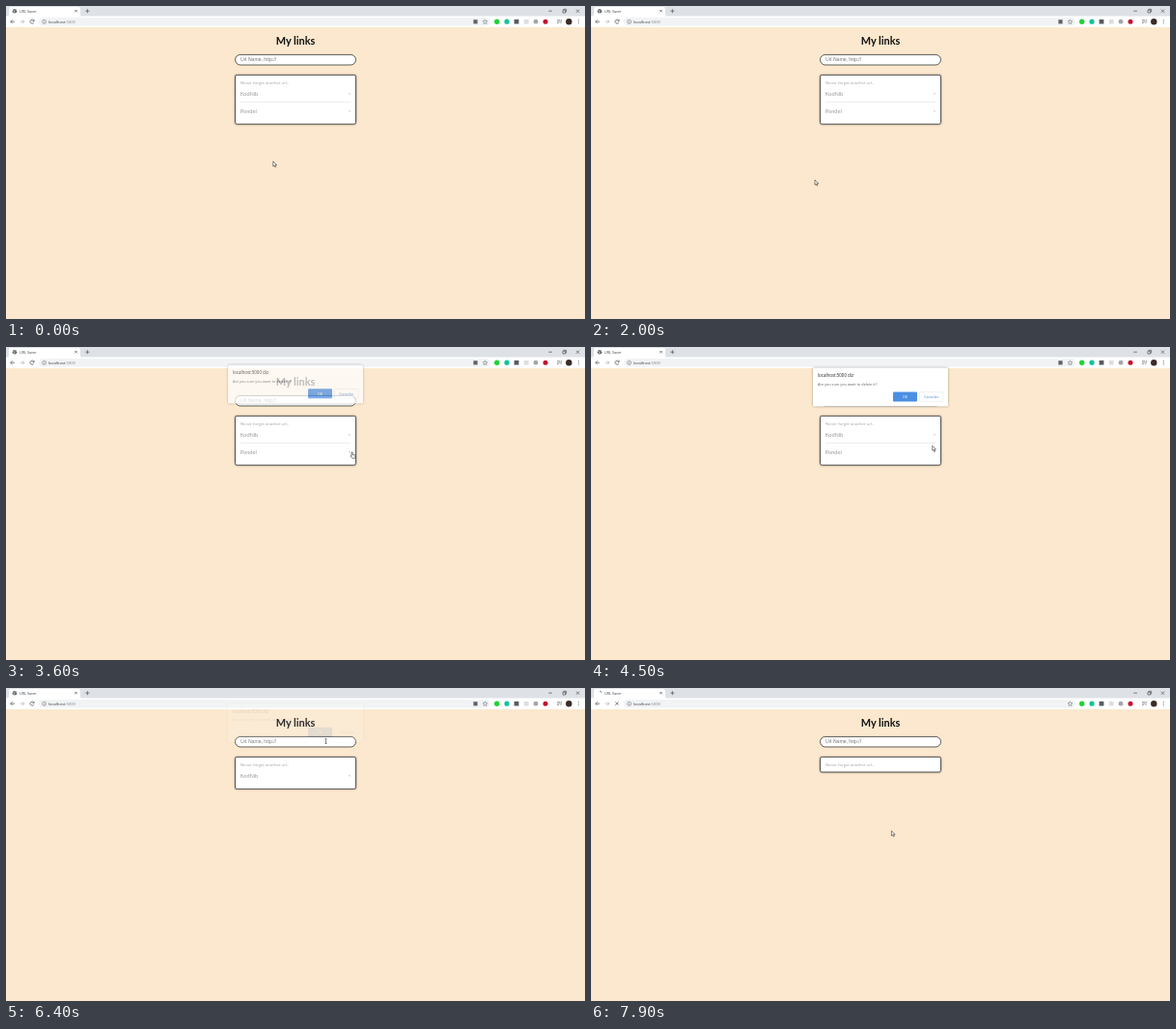
An HTML page that plays this animation: 600x324 px, repeating every 8 s.

```html
<!DOCTYPE html>
<html lang="en">
<head>
<meta charset="utf-8">
<title>URL Saver</title>
<style>
  html, body { margin: 0; width: 100%; height: 100%; overflow: hidden; background: #fbe8ce; }
  svg { display: block; width: 100vw; height: 100vh; }
  text { font-family: "Open Sans", sans-serif; fill: #3c4043; }
  .page text { font-family: Lato, sans-serif; }
  .page .field { font-family: "Liberation Sans", Arial, sans-serif; font-size: 5.1px; fill: #757575; }
  .row text { font-size: 5.6px; fill: #999; }
  .icon { fill: none; stroke: #5f6368; stroke-width: .8; }
  .box { fill: #fff; stroke: #333; stroke-width: .8; }
  .shadow { filter: drop-shadow(0 .8px 1.2px rgba(0, 0, 0, .4)); }
</style>
</head>
<body>
<svg viewBox="0 0 600 324">
  <g class="page">
    <rect width="600" height="324" fill="#fbe8ce"/>
    <text x="300" y="40" text-anchor="middle" font-size="10.9" font-weight="700" style="fill:#111">My links</text>
    <rect class="box" x="237.5" y="50.4" width="125" height="10.6" rx="5.3"/>
    <text class="field" x="243" y="57.4">Url Name, http://</text>
    <rect id="card" class="box shadow" x="237.5" y="71.4" width="125" height="50.8" rx="1.8"/>
    <text x="243" y="80.8" font-size="4.5" style="fill:#aaa">Never forget another url..</text>
    <g id="first" class="row">
      <text x="242.8" y="93">KodNib</text><text x="354.7" y="92.3" style="font-size:4px">×</text>
    </g>
    <g id="second" class="row">
      <path d="M243 99.4H357" stroke="#ddd" stroke-width=".6"/>
      <text x="242.8" y="110.5">Pondel</text><text x="354.7" y="109.8" style="font-size:4px">×</text>
    </g>
  </g>

  <g class="browser">
    <rect width="600" height="11" fill="#dee1e6"/>
    <rect y="10.5" width="600" height="11.5" fill="#fff"/>
    <path d="M1 11Q3 11 3 9V3Q3 1 5 1H75Q77 1 77 3V9Q77 11 79 11Z" fill="#fff"/>
    <g id="globe"><circle cx="9" cy="5.3" r="2.3" fill="#5f6368"/><path d="M7.4 4.5L9 5.2 8.6 6.8M9.4 3.6L10.6 4.6" stroke="#fff" stroke-width=".6" fill="none"/></g>
    <path id="spinner" class="icon" d="M9 3.2A2.1 2.1 0 0 1 11 4.8" stroke-width=".6"/>
    <text x="14" y="6.7" font-size="3.75">URL Saver</text>
    <path class="icon" d="M71.3 4l2.4 2.4m0-2.4l-2.4 2.4M82.4 5.2h4m-2-2v4M562.3 5.2h3.6M577 4.3h2.7v2.7h-2.7zM577.9 4.2v-.9h2.7v2.7h-.8M590.9 3.6l3.2 3.2m0-3.2l-3.2 3.2" stroke-width=".6"/>
    <path class="icon" d="M9 16.2H4.7m2-2l-2 2 2 2"/>
    <path class="icon" d="M14.6 16.2h4.3m-2-2l2 2-2 2" style="stroke:#bbb"/>
    <path id="reload" class="icon" d="M28.8 15.2A2 2 0 1 0 28.9 16.8M29.1 13.8v1.7h-1.7"/>
    <path id="stop" class="icon" d="M25.2 14.5l3.4 3.4m0-3.4l-3.4 3.4"/>
    <rect x="34" y="12" width="468" height="8.6" rx="4.3" fill="#f1f3f4"/>
    <circle class="icon" cx="39.6" cy="16.3" r="2" style="stroke-width:.5"/>
    <path class="icon" d="M39.6 15.2v.4m0 .5v1.3" style="stroke-width:.5"/>
    <text x="44" y="17.8" font-size="4.15">localhost<tspan fill="#80868b">:5000</tspan></text>
    <rect id="translate" x="484.4" y="14.2" width="4.2" height="4.2" fill="#5f6368"/>
    <path class="icon" d="M496.5 13.9l.7 1.6 1.7.2-1.3 1.1.4 1.7-1.5-.9-1.5.9.4-1.7-1.3-1.1 1.7-.2z" style="stroke-width:.5"/>
    <circle cx="508.7" cy="16.2" r="2.7" fill="#20d335"/>
    <circle cx="519" cy="16.2" r="2.6" fill="#15c39a"/>
    <rect x="526.6" y="13.9" width="4.8" height="4.6" fill="#555b60"/>
    <rect x="536.8" y="13.9" width="4.8" height="4.6" fill="#dedede"/>
    <circle cx="549" cy="16.2" r="2.4" fill="#a3a6aa"/>
    <circle cx="559" cy="16.2" r="2.5" fill="#c5122e"/>
    <path class="icon" d="M571 14.6h3m-3 1.5h3m-3 1.5h1.8M575 18v-3.4h1.2" style="stroke-width:.6"/>
    <circle cx="583.3" cy="16.2" r="3.2" fill="#3a2c28"/>
    <path d="M593.3 14.4v.01m0 1.79v.01m0 1.79v.01" stroke="#5f6368" stroke-linecap="round"/>
  </g>

  <g id="dialog">
    <rect class="shadow" x="230" y="21.6" width="140" height="40" rx="1.2" fill="#fff"/>
    <text x="235" y="31.3" font-size="4.45" style="fill:#222">localhost:5000 diz</text>
    <text x="235" y="39.9" font-size="3.82" style="fill:#5f6368">Are you sure you want to delete it?</text>
    <rect x="313" y="46.5" width="25" height="10" rx="1" fill="#4a8fe3"/>
    <text x="325.5" y="52.8" font-size="3.7" text-anchor="middle" style="fill:#fff">OK</text>
    <rect x="340.5" y="46.7" width="24.5" height="9.6" rx="1" fill="#fff" stroke="#dfe1e5" stroke-width=".5"/>
    <text x="352.7" y="52.8" font-size="3.7" text-anchor="middle" style="fill:#3f83e0">Cancelar</text>
  </g>

  <g id="pointer" stroke="#333" stroke-width=".6" stroke-linejoin="round" fill="#fff">
    <path id="arrow" d="M0 0V5.2L1.2 4.1 2 6 2.9 5.6 2.1 3.8H3.7Z"/>
    <path id="hand" d="M-.5.4Q0-.3.5.4V2.8L3 3.3Q3.6 3.5 3.5 4.2L3 6.6H.2L-1.6 4.2Q-1.5 3.4-.5 4Z"/>
    <path id="beam" d="M-.9-2.5H.9M0-2.5V2.5M-.9 2.5H.9" fill="none"/>
  </g>
</svg>
<script>
const LOOP = 8000, STEP = 100;
const el = id => document.getElementById(id);
const show = (id, on) => { el(id).style.display = on ? "" : "none"; };

// Pointer waypoints: time, x, y
const path = [
  [0, 276.8, 160.8], [900, 295, 167.2], [1100, 295.3, 167.7], [1300, 297.8, 169.3], [1500, 297.8, 169.3],
  [1600, 195.4, 177.8], [1700, 195.4, 177.8], [2000, 232, 180], [2300, 300, 161], [2600, 352, 139],
  [2800, 359.3, 122], [3200, 358.6, 108.6], [4100, 358.6, 108.6], [4200, 357, 109.5], [4400, 357, 109.5],
  [4800, 344, 80], [5300, 328.2, 51.3], [5900, 328.2, 51.3], [6400, 331.5, 55],
  [6800, 328, 110], [7300, 311.4, 147.8], [LOOP, 311.4, 147.8]
];

function pointerAt(t) {
  const i = path.findIndex(p => p[0] > t);
  const [t0, x0, y0] = path[i - 1], [t1, x1, y1] = path[i];
  const k = (t - t0) / (t1 - t0);
  return [x0 + (x1 - x0) * k, y0 + (y1 - y0) * k];
}

function dialogOpacity(t) {
  if (t < 3600 || t >= 6500) return 0;
  if (t < 3900) return 1 - .28 * ((3900 - t) / 300) ** 2;
  return t < 6300 ? 1 : t < 6400 ? .7 : .12;
}

function render(t) {
  const rows = t < 6300 ? 2 : t < 7900 ? 1 : 0;
  show("first", rows > 0);
  show("second", rows > 1);
  el("card").setAttribute("height", 15.6 + 17.6 * rows);

  const loading = t >= 7800;
  show("globe", !loading);
  show("reload", !loading);
  show("spinner", loading);
  show("stop", loading);
  show("translate", rows > 0);

  const opacity = dialogOpacity(t);
  el("dialog").setAttribute("opacity", opacity);
  el("dialog").setAttribute("transform", `translate(0 ${-6 * Math.sqrt(1 - opacity)})`);

  const [x, y] = pointerAt(t);
  const shape = t >= 3200 && t < 4100 ? "hand" : t >= 6300 && y < 61 ? "beam" : "arrow";
  for (const id of ["arrow", "hand", "beam"]) show(id, id === shape);
  el("pointer").setAttribute("transform", `translate(${x} ${y})`);
}

const start = performance.now();
function tick() {
  const t = (performance.now() - start) % LOOP;
  render(Math.floor(t / STEP) * STEP);
  requestAnimationFrame(tick);
}
tick();
</script>
</body>
</html>
```
